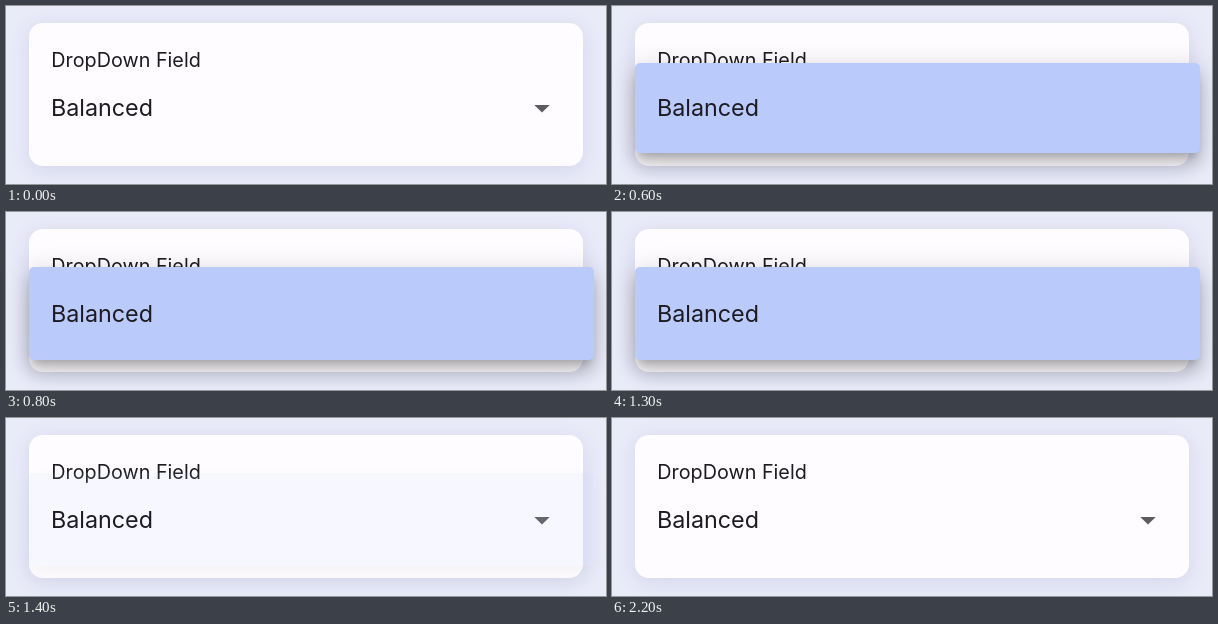
An HTML page for the animation above (2.8 s loop, 600x178 px).

```html
<!DOCTYPE html>
<html lang="en">
<head>
<meta charset="utf-8">
<title>Dropdown field</title>
<style>
  html, body { margin: 0; width: 100%; height: 100%; overflow: hidden; background: #e9ebf9; }
  #stage { position: relative; width: 600px; height: 178px; overflow: hidden; }
  #card, #menu { position: absolute; left: 23px; }
  #card {
    top: 17px; width: 554px; height: 143px;
    border-radius: 14px; background: #fefcff;
    box-shadow: 0 4px 20px rgba(70, 80, 140, .13);
  }
  #menu {
    top: 55px; width: 565px; height: 93px;
    border-radius: 5px; background: #bacafb; opacity: 0;
    box-shadow: 0 7px 9px -4px rgba(0, 0, 0, .2),
                0 12px 18px 1px rgba(0, 0, 0, .14),
                0 4px 25px 3px rgba(0, 0, 0, .12);
  }
  svg { position: absolute; left: 0; top: 0; }
  text { font-family: Inter, "Open Sans", sans-serif; fill: #1d1b20; }
  .label { font-size: 19.8px; }
  .value { font-size: 23.3px; }
</style>
</head>
<body>
<div id="stage">
  <div id="card"></div>
  <svg width="600" height="178">
    <text class="label" x="45.3" y="61">DropDown Field</text>
    <path d="M528.3 99H543.7L536 106.5Z" fill="#5c5b5f"/>
  </svg>
  <div id="menu"></div>
  <svg width="600" height="178">
    <text class="value" x="45" y="110.3">Balanced</text>
  </svg>
</div>
<script>
  const LOOP = 2800, OPEN = 500, GROWN = 800, FADE = 1400, CLOSED = 1500;
  const menu = document.getElementById('menu');
  const at = (time, style, easing = 'step-end') => ({ offset: time / LOOP, easing, ...style });
  const play = frames => menu.animate(frames, { duration: LOOP, iterations: Infinity });

  const small = { top: '58px', height: '88px' };
  const full = { top: '55px', height: '93px' };
  play([at(0, small), at(OPEN, small, 'steps(3, end)'), at(GROWN, full), at(LOOP, full)]);

  const hidden = { opacity: 0 };
  play([
    at(0, hidden), at(OPEN, { opacity: 1 }), at(FADE, { opacity: .1 }),
    at(CLOSED, hidden), at(LOOP, hidden)
  ]);
</script>
</body>
</html>
```
